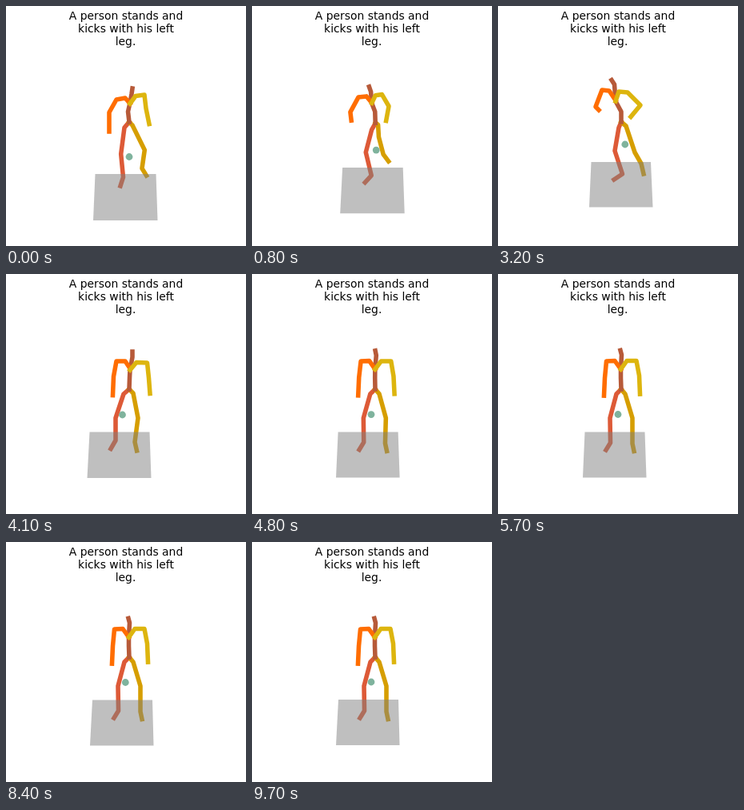
An HTML page for the animation above (9800 ms loop, 300 px wide and 300 px high).

```html
<!DOCTYPE html>
<html lang="en">
<head>
<meta charset="utf-8">
<title>Kick</title>
<style>
html, body { margin: 0; width: 100%; height: 100%; overflow: hidden; background: #fff; }
svg { display: block; width: 300px; height: 300px; }
text { font: 13.89px "DejaVu Sans", sans-serif; text-anchor: middle; }
.limb { fill: none; stroke-width: 5.56; stroke-linecap: square; stroke-linejoin: round; }
.limb, #floor, #dot { animation: 9800ms infinite; }

#legR { stroke: #dd5a37; animation-name: legR; }
#legL { stroke: #d69e00; animation-name: legL; }
#spine { stroke: #b75a39; animation-name: spine; }
#armR { stroke: #ff6d00; animation-name: armR; }
#armL { stroke: #ddb50e; animation-name: armL; }
#floor { fill: rgba(128, 128, 128, .5); animation-name: floor; }
#dot { fill: #7fb39d; r: 4.4px; animation-name: dot; }

/* One step per 100 ms; poses at 0, 1.9, 3.2, 4.1 and 5 s, then at rest. */
@keyframes legR {
  0% { d: path("M154 145L148 152L143.7 185L146.5 214L143 225"); animation-timing-function: steps(19); }
  19.3878% { d: path("M155 148L152 158L140.3 180L153 209L139 214.5"); animation-timing-function: steps(13); }
  32.6531% { d: path("M154 145L151 152L146 181L155.5 210L145 217"); animation-timing-function: steps(9); }
  41.8367% { d: path("M154 144L147 150L137 180L137 208L131 218.5"); animation-timing-function: steps(9); }
  51.0204%, 100% { d: path("M154 144L148 150L140 180L140.5 211L135 220"); }
}
@keyframes legL {
  0% { d: path("M154 145L158 149L173.3 180L170 203L175.5 212"); animation-timing-function: steps(19); }
  19.3878% { d: path("M155 147L157 147.5L138 141L156 161L164 169.5"); animation-timing-function: steps(13); }
  32.6531% { d: path("M154 145L160 150L171 183L179 197L182 210"); animation-timing-function: steps(9); }
  41.8367% { d: path("M154 144L159 149L165 180L161 210L163.5 221"); animation-timing-function: steps(9); }
  51.0204%, 100% { d: path("M154 144L159 150L168 180L168 212L170 221.5"); }
}
@keyframes spine {
  0% { d: path("M154 145L152.5 132L155 121L157 110L158 103"); animation-timing-function: steps(19); }
  19.3878% { d: path("M154.5 148L155.5 132L142 121L137 103L130.5 98"); animation-timing-function: steps(13); }
  32.6531% { d: path("M154 145L154 132L147 119L145.5 98L142 92.5"); animation-timing-function: steps(9); }
  41.8367% { d: path("M154 144L154.5 130L155 120L158 104L158 97"); animation-timing-function: steps(9); }
  51.0204%, 100% { d: path("M154 144L153.5 130L153.5 119L154.5 101L153 95.5"); }
}
@keyframes armR {
  0% { d: path("M155 122L149 115L138 117L129 133L129 157"); animation-timing-function: steps(19); }
  19.3878% { d: path("M142 119L135 110L126 110L114.5 132L117.5 124"); animation-timing-function: steps(13); }
  32.6531% { d: path("M147 118L139 106L130 105L122 126L126 130"); animation-timing-function: steps(9); }
  41.8367% { d: path("M155 118L149 109L138 109L134.5 128L133.5 151.5"); animation-timing-function: steps(9); }
  51.0204%, 100% { d: path("M153.5 119L146 108.5L135.5 109L133.5 130L132.5 152"); }
}
@keyframes armL {
  0% { d: path("M155 122L162 112.5L173 111L175 128L179 147.5"); animation-timing-function: steps(19); }
  19.3878% { d: path("M142.5 120L143.7 111L148 110L165.5 121.5L152 138"); animation-timing-function: steps(13); }
  32.6531% { d: path("M147 119L151 107L162 108L178 124L166 138.5"); animation-timing-function: steps(9); }
  41.8367% { d: path("M155 120L163 110.5L176.5 111L178.5 130L180 149.5"); animation-timing-function: steps(9); }
  51.0204%, 100% { d: path("M153.5 119L161 108.5L173 108.5L176.5 127L177.5 150"); }
}
@keyframes floor {
  0% { d: path("M111.5 210L187.5 210L189.5 268L109 268Z"); animation-timing-function: steps(10); }
  10.2041% { d: path("M113.5 200L189 200L191 257L110.5 257Z"); animation-timing-function: steps(9); }
  19.3878% { d: path("M116 195.5L190.5 195.5L193 252L113.5 252Z"); animation-timing-function: steps(7); }
  26.5306% { d: path("M120 195L194.5 195L197.5 251.5L118 251.5Z"); animation-timing-function: steps(6); }
  32.6531% { d: path("M116.5 195L191 195L193.5 251.5L114 251.5Z"); animation-timing-function: steps(9); }
  41.8367% { d: path("M104.5 197.5L179.5 197.5L181.5 255L101.5 255Z"); animation-timing-function: steps(9); }
  51.0204%, 58.1633% { d: path("M108.5 197.5L183.5 197.5L185.5 254.5L106 254.5Z"); animation-timing-function: steps(15); }
  73.4694%, 92.8571% { d: path("M108 197.5L183 197.5L184.5 254.5L105 254.5Z"); animation-timing-function: steps(6); }
  98.9796%, 100% { d: path("M108 197L183 197L184.5 254L105 254Z"); }
}
@keyframes dot {
  0% { cx: 154px; cy: 188.5px; animation-timing-function: steps(10); }
  10.2041% { cx: 155.5px; cy: 178px; animation-timing-function: steps(9); }
  19.3878% { cx: 158px; cy: 173.5px; animation-timing-function: steps(7); }
  26.5306% { cx: 162.5px; cy: 173px; animation-timing-function: steps(6); }
  32.6531% { cx: 158.8px; cy: 173px; animation-timing-function: steps(9); }
  41.8367% { cx: 145.5px; cy: 176px; animation-timing-function: steps(9); }
  51.0204%, 58.1633% { cx: 150px; cy: 175.5px; animation-timing-function: steps(15); }
  73.4694%, 92.8571% { cx: 149.3px; cy: 175.5px; animation-timing-function: steps(6); }
  98.9796%, 100% { cx: 149px; cy: 175px; }
}
</style>
</head>
<body>
<svg viewBox="0 0 300 300">
  <text x="150" y="17">A person stands and</text>
  <text x="150" y="33">kicks with his left</text>
  <text x="149.5" y="49">leg.</text>
  <path id="legR" class="limb"/>
  <path id="legL" class="limb"/>
  <path id="spine" class="limb"/>
  <path id="armR" class="limb"/>
  <path id="armL" class="limb"/>
  <path id="floor"/>
  <circle id="dot"/>
</svg>
</body>
</html>
```
